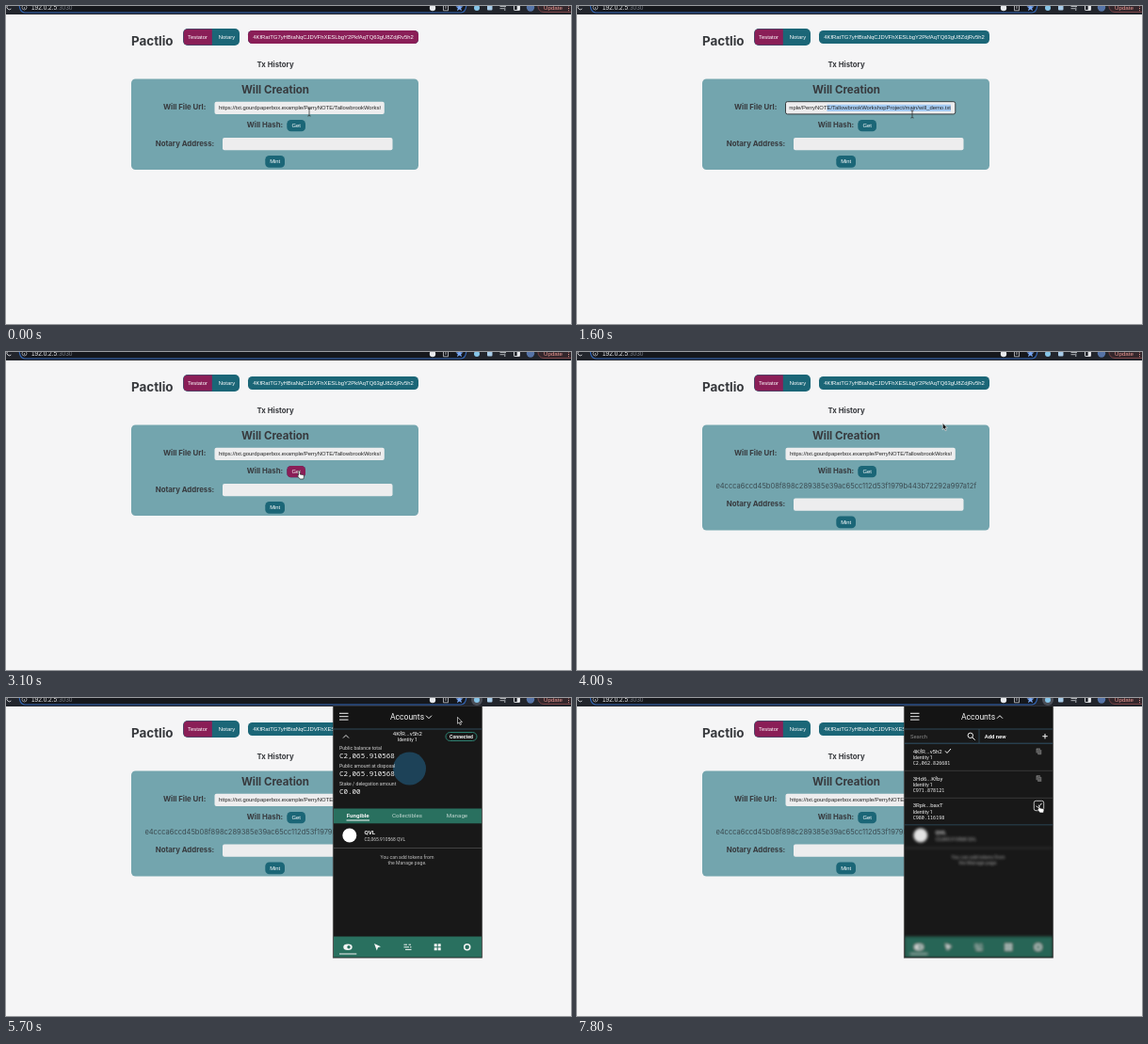
An HTML page that plays this animation: 600x338 px, repeating every 8 s.

```html
<!DOCTYPE html>
<html lang="en">
<head>
<meta charset="utf-8">
<title>Will creation</title>
<style>
html, body { margin: 0; width: 100%; height: 100%; overflow: hidden; background: #f5f5f6; }
svg { display: block; width: 100%; height: 100%; }
text { white-space: pre; }
.page { font-family: Inter, sans-serif; fill: #37393d; }
.head { font-weight: 700; }
.label { font-weight: 700; font-size: 7.8px; }
.ui { font-family: "Liberation Sans", Arial, sans-serif; font-size: 5.9px; }
.btn { fill: #fff; text-anchor: middle; }
.app { font-family: Roboto, sans-serif; fill: #f4f4f4; font-size: 5.15px; }
.mono { font-family: "Noto Sans Mono", monospace; }
.mid { text-anchor: middle; }
.bold { font-weight: 700; }
.line { fill: none; stroke: #f4f4f4; stroke-width: 1; }
</style>
</head>
<body>
<svg viewBox="0 0 600 338" preserveAspectRatio="none">
  <defs>
    <clipPath id="fieldClip"><rect x="225.5" y="101" width="172.3" height="14"/></clipPath>
    <clipPath id="popupClip"><rect x="348" y="9" width="157" height="266.5"/></clipPath>
    <clipPath id="menuClip"><rect id="menuArea" x="348" y="33" width="157" height="0"/></clipPath>
    <filter id="soft" x="-10%" y="-10%" width="120%" height="120%"><feGaussianBlur id="blur" stdDeviation="0"/></filter>
    <g id="copy">
      <rect x="-2.8" y="-3.3" width="4.4" height="5" rx=".6" fill="#777"/>
      <rect x="-1.4" y="-1.8" width="4.4" height="5.2" rx=".6" fill="#777" stroke="#181818" stroke-width=".5"/>
      <path d="M-.3 0H2M-.3 1.4H2" stroke="#222" stroke-width=".5"/>
    </g>
  </defs>

  <rect width="600" height="338" fill="#f5f5f6"/>

  <g id="bar">
    <rect width="600" height="9" fill="#22252c"/>
    <path d="M14 -4Q14 7 20 7H483Q489 7 489 -4" fill="#15171c" stroke="#3366b5" stroke-width="1.2"/>
    <path d="M5 -1A2.6 2.6 0 1 0 5.4 3" fill="none" stroke="#d8dade" stroke-width=".9"/>
    <circle cx="19.5" cy="1.5" r="2.5" fill="none" stroke="#c5c8cd" stroke-width=".7"/>
    <path d="M19.5 1V3" stroke="#c5c8cd" stroke-width=".7"/>
    <text class="ui" x="27" y="4" style="font-size:6.5px" fill="#e9eaec">192.0.2.5<tspan fill="#777c84">:3030</tspan></text>
    <circle cx="453" cy="2" r="3.2" fill="#e8eaed"/>
    <path d="M465 0H464.5V4.8H469.5V0H469M467 3V-2" fill="none" stroke="#c8cacf" stroke-width=".8"/>
    <path d="M481.5 -3L482.6 .2 485.5 .4 483.2 2.3 484 5.2 481.5 3.6 479 5.2 479.8 2.3 477.5 .4 480.4 .2Z" fill="#78a7f3"/>
    <circle id="halo" cx="500" cy="2" r="6" fill="#4a4e57"/>
    <circle cx="500" cy="2" r="3" fill="#86c5e8"/>
    <rect x="511" y="-1" width="5.5" height="5.5" rx="1" fill="#a8cbe8"/>
    <path d="M524.5 .5H531M524.5 2.7H529M529.8 1.5V5" fill="none" stroke="#d5d8dc" stroke-width=".8"/>
    <rect x="539.5" y="-1" width="6" height="5.5" rx=".6" fill="none" stroke="#e6e8eb" stroke-width=".9"/>
    <rect x="542.7" y="-1" width="2.8" height="5.5" fill="#e6e8eb"/>
    <circle cx="557" cy="1.5" r="4.2" fill="#5674a8"/>
    <rect x="565" y="-8" width="40" height="14.5" rx="6" fill="#33262b" stroke="#8d4a4c" stroke-width=".8"/>
    <text class="ui" x="571" y="3.8" style="font-size:6.2px" fill="#ef9a94">Update</text>
    <path d="M597.5 -.5V.5M597.5 2V3M597.5 4.3V5.2" stroke="#ef9a94"/>
  </g>

  <g class="page">
    <text class="head" x="133" y="41.7" font-size="13.4">Pactlio</text>
    <rect x="188" y="24" width="60" height="18" rx="5" fill="#1b6677"/>
    <path d="M193 24.5H218.8V41.5H193Q188.5 41.5 188.5 37V29Q188.5 24.5 193 24.5Z" fill="#8a1e57"/>
    <text class="ui btn" x="203.5" y="35.2">Testator</text>
    <text class="ui btn" x="234.5" y="35.2">Notary</text>
    <rect x="257" y="26" width="181" height="14" rx="4.5" fill="#1b6677"/>
    <rect id="walletHot" x="257" y="26" width="181" height="14" rx="4.5" fill="#8a1e57"/>
    <text class="ui btn" x="347.5" y="35.1">4KfRatTG7yHBtaNqCJDVFhXESLbgY2PkfAqTQ63gU8ZdjRv5h2</text>
    <text class="label mid" x="286" y="65">Tx History</text>

    <rect id="panel" x="133" y="77.5" width="305" height="96.5" rx="4.5" fill="#73a5ae"/>
    <text class="head mid" x="286" y="93.2" font-size="11.5">Will Creation</text>
    <text class="label" x="167" y="110.2">Will File Url:</text>
    <rect id="field" x="221.5" y="101.7" width="180.3" height="13.2" rx="2" fill="#ededee"/>
    <g clip-path="url(#fieldClip)">
      <rect id="mark" y="104.7" height="7.3" fill="#a5cbf3"/>
      <text id="url" class="ui" x="226" y="110.3" fill="#222">https://txt.gourdpaperbox.example/PerryNOTE/TallowbrookWorkshopProject/main/will_demo.txt</text>
    </g>
    <text class="label" x="255.7" y="129.3">Will Hash:</text>
    <rect x="298.3" y="121" width="19.7" height="12.3" rx="4.3" fill="#1b6677"/>
    <rect id="getHot" x="298.3" y="121" width="19.7" height="12.3" rx="4.3" fill="#8a1e57"/>
    <text class="ui btn" x="308.2" y="129.2">Get</text>
    <text id="hash" class="mid" x="285.8" y="145" font-size="7.5" fill="#3b4a50">e4ccca6ccd45b08f898c289385e39ac65cc112d53f1979b443b72292a997a12f</text>
    <g id="lower">
      <text class="label" x="158.7" y="148.6">Notary Address:</text>
      <rect x="230" y="140" width="180.5" height="13.3" rx="2" fill="#ededee"/>
      <rect x="275.3" y="159" width="20.7" height="12.7" rx="4.3" fill="#1b6677"/>
      <text class="ui btn" x="285.7" y="167.4">Mint</text>
    </g>
  </g>

  <rect id="seed" x="494.5" y="8.5" width="11" height="11" fill="#f7f7f7" stroke="#c4c4c4" stroke-width=".8"/>

  <g id="popup" class="app">
    <rect x="346.8" y="9" width="159.4" height="268" rx="1" fill="#000" opacity=".25"/>
    <rect x="347.5" y="9" width="158" height="267" fill="#181818" stroke="#4a4a4a" stroke-width=".6"/>
    <g clip-path="url(#popupClip)">
      <g id="body" filter="url(#soft)">
        <g id="overview">
          <circle cx="428.5" cy="75" r="17.5" fill="#1d4258"/>
          <path class="line" d="M358 42.5L361 39.5 364 42.5" style="stroke-width:.9"/>
          <text class="mid" x="426.3" y="39.8" font-size="6.1" style="font-size:6.1px">4KfR...v5h2</text>
          <text class="mid" x="426.3" y="46">Identity 1</text>
          <rect x="467" y="36.5" width="33" height="9" rx="4.5" fill="none" stroke="#2f8d7b" stroke-width=".9"/>
          <text class="mid bold" x="483.5" y="42.9">Connected</text>
          <g id="balances"></g>
          <rect x="348" y="117.5" width="157" height="15.8" fill="#29705f"/>
          <g class="mid" style="font-size:6.2px">
            <text class="bold" x="373.7" y="127.4">Fungible</text>
            <text x="426" y="127.4" fill="#c3d8d2">Collectibles</text>
            <text x="479" y="127.4" fill="#c3d8d2">Manage</text>
          </g>
          <path class="line" d="M361.5 130H386"/>
        </g>
        <circle cx="364.8" cy="146" r="7.5" fill="#fff"/>
        <text class="bold" x="380.5" y="145.3" style="font-size:6.2px">QVL</text>
        <text x="380.5" y="152.3" fill="#cfcfcf" style="font-size:4.95px">C2,065.910568 QVL</text>
        <path d="M348 159.5H505" stroke="#555" stroke-width=".7"/>
        <g class="mid" fill="#bdbdbd">
          <text x="426" y="170.8">You can add tokens from</text>
          <text x="426" y="176.7">the Manage page.</text>
        </g>
        <g id="nav">
          <rect x="348" y="253.5" width="157" height="22.5" fill="#29705f"/>
          <ellipse cx="363" cy="264.7" rx="4.7" ry="3.3" fill="#f4f4f4"/>
          <circle cx="364" cy="264.7" r="1.7" fill="#29705f"/>
          <path d="M391 261L398 264.2 395 265.2 393.8 268.4Z"/>
          <path class="line" d="M422.5 262.2H426M427.5 262.2H430M422.5 264.8H428M429 264.8H430.5M424 267.4H430.5"/>
          <path d="M454.7 261.2H457.7V264.2H454.7ZM458.7 261.2H461.7V264.2H458.7ZM454.7 265.2H457.7V268.2H454.7ZM458.7 265.2H461.7V268.2H458.7Z"/>
          <circle class="line" cx="489.7" cy="264.7" r="3" style="stroke-width:1.5"/>
          <path class="line" d="M354 272H372.3"/>
        </g>
      </g>

      <g clip-path="url(#menuClip)">
        <rect x="348" y="33" width="157" height="102.5" fill="#181818"/>
        <text x="354" y="42.7" fill="#858585" style="font-size:5.9px">Search</text>
        <circle class="line" cx="417.8" cy="39.8" r="2.7"/>
        <path class="line" d="M419.8 41.8L422.7 44.7M494.3 40.7H499.7M497 38V43.4"/>
        <path d="M427 33V48" stroke="#35566a" stroke-width=".7"/>
        <text class="bold" x="432.7" y="42.7" style="font-size:5.9px">Add new</text>
        <g id="rows"></g>
        <path class="line" d="M391 56.3L393 58.5 397 54"/>
        <path d="M348 48.2H505M348 135H505" stroke="#35607a" stroke-width=".8"/>
        <path d="M348 77.3H505M348 106.3H505" stroke="#4c4c4c" stroke-width=".6"/>
        <g id="copied">
          <rect x="485.3" y="109.3" width="10.4" height="10.4" rx="2" fill="#181818" stroke="#e8e8e8" stroke-width=".8"/>
          <use id="copyHot" href="#copy" x="490.4" y="114.5"/>
          <path id="tick" class="line" d="M487.7 114.7L489.7 116.7 493.5 111.8"/>
        </g>
      </g>

      <rect x="348" y="9" width="157" height="24" fill="#141414"/>
      <path d="M348 33H505" stroke="#35566a" stroke-width=".8"/>
      <path class="line" d="M354 16.3H363.5M354 19.7H363.5M354 23.1H363.5"/>
      <text class="mid" x="426" y="23" style="font-size:8.6px">Accounts</text>
      <path id="chevron" class="line"/>
    </g>
  </g>

  <g id="cursor">
    <path id="beam" d="M-1.6 -4Q0 -4 0 -3V3Q0 4 -1.6 4M1.6 -4Q0 -4 0 -3M0 3Q0 4 1.6 4" fill="none" stroke="#333" stroke-width=".8"/>
    <path id="arrow" d="M0 0V7L1.6 5.6 2.8 8.2 4 7.7 2.8 5.2H5Z" fill="#111" stroke="#fff" stroke-width=".6"/>
    <path id="hand" d="M0 1.2C0 -.2 1.7 -.2 1.7 1.2V4L5 4.6Q6 4.9 6 6L5.4 9H1.6L-1 5.8Q-1.2 4.6 0 5.2Z" fill="#fff" stroke="#111" stroke-width=".6"/>
  </g>
</svg>
<script>
const LOOP = 8000, STEP = 100;
const $ = id => document.getElementById(id);
const set = (id, attrs) => { for (const k in attrs) $(id).setAttribute(k, attrs[k]); };
const show = (id, on) => { $(id).style.display = on ? "" : "none"; };
const ramp = (t, from, to) => Math.min(1, Math.max(0, (t - from) / (to - from)));
const ease = p => p * p * (3 - 2 * p);

$("balances").innerHTML = [
  ["Public balance total", "2,065.910568"],
  ["Public amount at disposal", "2,065.910568"],
  ["Stake / delegation amount", "0.00"]
].map(([name, sum], i) => {
  const y = 55 + i * 18.9;
  return `<text x="354" y="${y}" fill="#d0d0d0">${name}</text>
    <text class="mono" x="354" y="${y + 8.7}" style="font-size:7.55px;font-weight:500">C${sum}</text>`;
}).join("");

$("rows").innerHTML = [
  ["4KfR...v5h2", "2,062.826681"],
  ["3Hd6...Kfby", "971.878121"],
  ["3Rpk...baxT", "980.116198"]
].map(([name, sum], i) => {
  const y = 58.8 + i * 28.8;
  return `<text x="356.7" y="${y}" style="font-size:6.1px">${name}</text>
    <text x="356.7" y="${y + 6.2}">Identity 1</text>
    <text class="mono" x="356.7" y="${y + 12.4}" style="font-size:5.1px">C${sum}</text>
    <use href="#copy" x="490.4" y="${y - 2}"/>`;
}).join("");

// time, x, y of the pointer's hot spot
const path = [
  [0, 322, 113], [100, 322, 113], [700, 343, 109], [1000, 343, 109],
  [1600, 356, 115], [1800, 354, 117], [2500, 310.5, 126], [3600, 310.5, 126],
  [4500, 497, 5], [4900, 499.5, 0], [5300, 499.5, 0], [5700, 479.5, 20.3],
  [6200, 447.7, 22], [6700, 447.7, 22], [7200, 489, 96], [7550, 490, 113], [8000, 490, 113]
];
// time from which each pointer shape is used
const shapes = [
  [0, "beam"], [1900, "arrow"], [2300, "hand"], [3700, "arrow"],
  [4800, "hand"], [5400, "arrow"], [6000, "hand"], [6800, "arrow"], [7100, "hand"]
];

function pointer(t) {
  let i = 1;
  while (i < path.length - 1 && t > path[i][0]) i++;
  const a = path[i - 1], b = path[i], p = ease(ramp(t, a[0], b[0]));
  return [a[1] + (b[1] - a[1]) * p, a[2] + (b[2] - a[2]) * p];
}

function drawField(t, x) {
  const url = $("url"), text = url.textContent;
  const focused = t >= 1000 && t < 2900, atEnd = t >= 1500 && t < 2900;
  const start = atEnd ? 397 - url.getComputedTextLength() : 226;
  const anchor = start + url.getSubStringLength(0, text.indexOf("E/Tallow"));
  url.setAttribute("x", start);
  set("field", { stroke: focused ? "#2b2f33" : "none", "stroke-width": .9 });
  set("mark", { x: anchor, width: focused ? Math.max(0, (atEnd ? 397 : x) - anchor) : 0 });
}

function render(t) {
  const [x, y] = pointer(t);
  const shape = shapes.filter(s => t >= s[0]).pop()[1];
  set("cursor", { transform: `translate(${x} ${y})` });
  for (const id of ["beam", "arrow", "hand"]) show(id, id === shape);

  drawField(t, x);
  set("walletHot", { opacity: 1 - ramp(t, 0, 300) });
  set("getHot", { opacity: ramp(t, 2250, 2450) - ramp(t, 3700, 3900) });

  const hashed = t >= 3300, drop = hashed ? 15.5 : 0;
  show("hash", hashed);
  set("panel", { height: 96.5 + drop });
  set("lower", { transform: `translate(0 ${drop})` });

  show("halo", t >= 4800);
  show("seed", t >= 5200 && t < 5300);
  show("popup", t >= 5300);

  const open = ease(ramp(t, 6350, 6600));
  set("menuArea", { height: 102.5 * open });
  set("blur", { stdDeviation: 1.7 * open });
  set("body", { opacity: 1 - .12 * open });
  show("overview", open < 1);
  set("chevron", { d: open > 0 ? "M446 21.7L449 18.7 452 21.7" : "M446 18.7L449 21.7 452 18.7" });

  show("copied", t >= 7500);
  show("copyHot", t < 7800);
  show("tick", t >= 7800);
}

const began = performance.now();
function tick(now) {
  const t = Math.max(0, now - began) % LOOP;
  render(Math.floor(t / STEP) * STEP);
  requestAnimationFrame(tick);
}
render(0);
requestAnimationFrame(tick);
</script>
</body>
</html>
```
